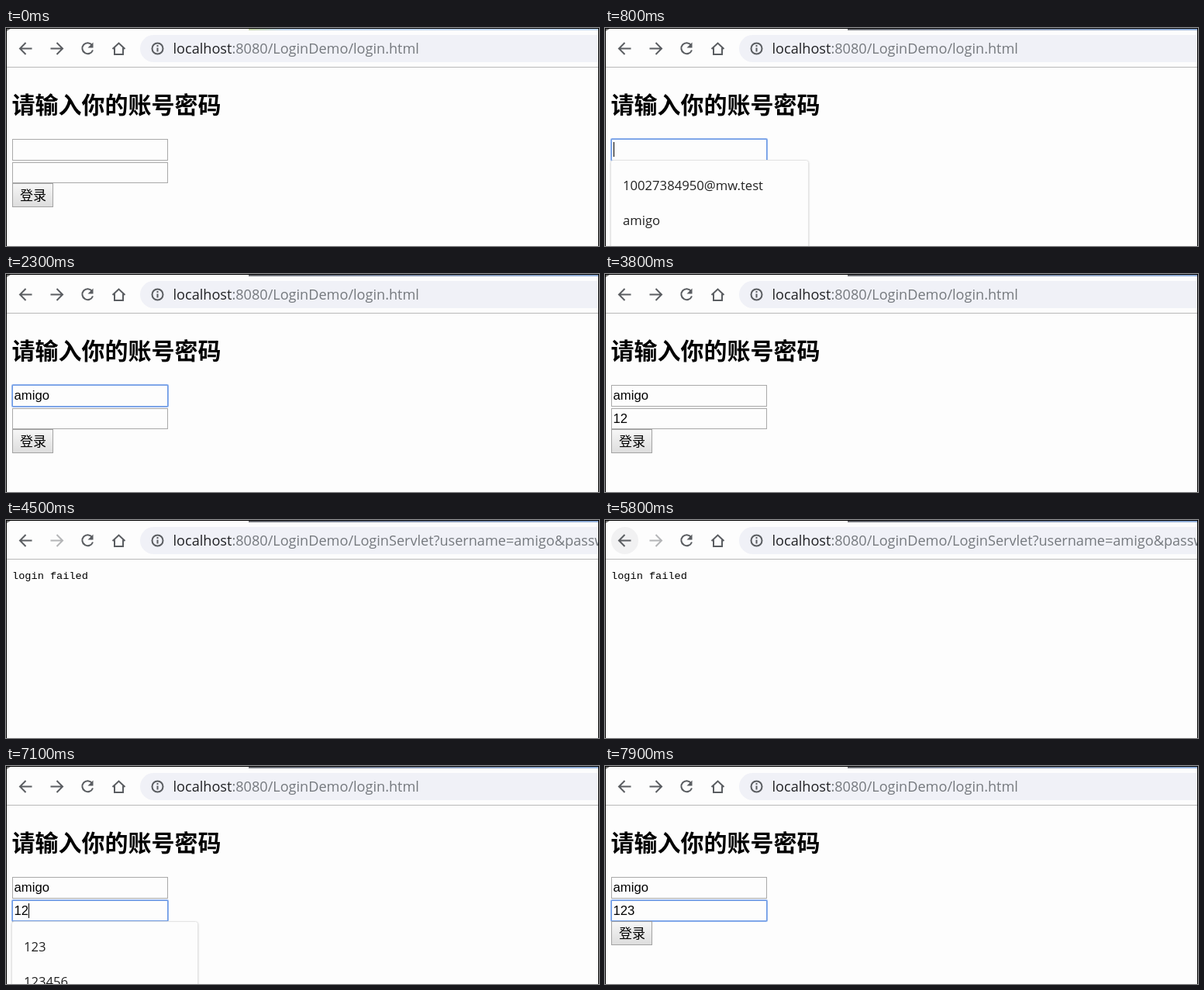
An HTML page that plays this animation: 765x281 px, repeating every 8 s.

```html
<!DOCTYPE html>
<html lang="zh">
<head>
<meta charset="utf-8">
<title>Login demo</title>
<style>
  html, body { margin: 0; width: 100%; height: 100%; overflow: hidden; background: #fdfdfd; }
  svg { display: block; }
  text { white-space: pre; }
  .ui { font-family: "Open Sans", "Noto Sans CJK SC", "Noto Sans CJK", sans-serif; }
  .cjk { font-family: "Noto Sans CJK SC", "Noto Sans CJK", sans-serif; font-weight: 350; }
  .url { font-size: 18.13px; fill: #75797e; }
  .url .host { fill: #202124; }
  .icon { fill: none; stroke: #5a5d61; stroke-width: 2; }
  .field rect { fill: #fdfdfd; stroke: #a9a9a9; }
  .field text { font: 16.67px "Liberation Sans", Arial, sans-serif; }
  .field.focus rect { stroke: #6f9ce6; }
  .field .glow { fill: none; stroke: none; }
  .field.focus .glow { stroke: #8fb1ec; }
  .list rect { fill: #fdfdfd; stroke: #e4e4e4; filter: drop-shadow(0 1px 1px #0003); }
  .list text { font-size: 16.67px; fill: #222; }
  .off { display: none; }
</style>
</head>
<body>
<svg width="765" height="281" viewBox="0 0 765 281">
  <defs>
    <linearGradient id="face" x2="0" y2="1">
      <stop stop-color="#f6f6f6"/><stop offset="1" stop-color="#dddddd"/>
    </linearGradient>
    <linearGradient id="bright">
      <stop stop-color="#c3d3a4"/><stop offset=".1" stop-color="#b9d0ea"/><stop offset="1" stop-color="#c3daf5"/>
    </linearGradient>
    <linearGradient id="dim">
      <stop stop-color="#6b6d72"/><stop offset=".4" stop-color="#7f8ca6"/><stop offset="1" stop-color="#8fadd8"/>
    </linearGradient>
  </defs>

  <rect width="765" height="281" fill="#fdfdfd"/>

  <g id="form">
    <text class="cjk" x="7.5" y="109.5" font-size="30" style="font-weight: 700">请输入你的账号密码</text>
    <g class="field" id="user">
      <rect x="8.5" y="143.5" width="200" height="27"/>
      <rect class="glow" x="7.5" y="142.5" width="202" height="29" rx="1"/>
      <text x="10.6" y="162"></text>
    </g>
    <g class="field" id="pass">
      <rect x="8.5" y="173.5" width="200" height="26"/>
      <rect class="glow" x="7.5" y="172.5" width="202" height="28" rx="1"/>
      <text x="10.6" y="192"></text>
    </g>
    <rect id="button" x="8.5" y="200.5" width="52" height="30" fill="url(#face)" stroke="#a3a3a3"/>
    <text class="cjk" x="18" y="222" font-size="17">登录</text>
    <rect id="caret" width="1" height="19"/>
  </g>

  <text id="result" x="8" y="76" font-size="13.6" font-family="'Liberation Mono', monospace">login failed</text>

  <g class="list ui" id="users">
    <rect x="7.5" y="170.5" width="255" height="130" rx="3"/>
    <text x="23" y="209">10027384950@mw.test</text>
    <text x="23" y="254">amigo</text>
  </g>
  <g class="list ui" id="match">
    <rect x="7.5" y="170.5" width="240" height="67" rx="3"/>
    <text x="23" y="209">amigo</text>
  </g>
  <g class="list ui" id="codes">
    <rect x="7.5" y="200.5" width="240" height="100" rx="3"/>
    <text x="23" y="239">123</text>
    <text x="23" y="284">123456</text>
  </g>

  <rect width="765" height="50" fill="#fdfdfd"/>
  <rect y="50" width="765" height="1" fill="#b9b9b9"/>
  <path d="M764 9H190.5a17.5 17.5 0 0 0 0 35H764Z" fill="#f0f1f7"/>
  <circle id="ring" cx="25.5" cy="26.5" r="17.5"/>
  <g class="icon">
    <g transform="translate(-.5 -.5)">
      <path d="M34 27H19M26 19.5L18.5 27l7.5 7.5"/>
      <path id="forward" d="M58 27H73M66 19.5L73.5 27L66 34.5"/>
      <path d="M111.5 22.5A7 7 0 1 0 112.5 29"/>
      <path d="M113 19v7h-7Z" fill="#5a5d61" stroke="none"/>
      <path d="M138 27.5L146 20l8 7.5M140.5 26v8.5h11V26"/>
    </g>
    <circle cx="195.5" cy="26.5" r="7"/>
    <path d="M195.5 25.5v5M195.5 22v2"/>
  </g>
  <text class="url ui" x="215.5" y="33"><tspan class="host">localhost</tspan><tspan id="path"></tspan></text>

  <g id="tip">
    <rect x="23.5" y="43.5" width="237" height="24" fill="#fff" stroke="#7b7b7b"/>
    <text class="cjk" x="30" y="61" font-size="15" fill="#575757">点击可返回，按住可查看历史记录</text>
  </g>

  <rect id="strip" x="313" y="1" width="451" height="2"/>
  <path d="M0 0H765V281H764V1H1V281H0Z"/>
  <path d="M1 1h5l-5 3Z" fill="#777"/>
</svg>
<script>
  const LOOP = 8000;
  const HOME = ":8080/LoginDemo/login.html";
  const SENT = ":8080/LoginDemo/LoginServlet?username=amigo&password=12";
  const $ = id => document.getElementById(id);

  // Each entry patches the state from its time on.
  const steps = [
    [0, { user: "", pass: "", focus: "", list: "", caret: false, pressed: false, strip: "bright",
          path: HOME, failed: false, forward: true, ring: "none", tip: 0 }],
    [800, { focus: "user", list: "users", caret: true, strip: "dim" }],
    [1200, { user: "a" }],
    [1300, { list: "match" }],
    [1600, { user: "am" }],
    [1700, { user: "ami" }],
    [1800, { user: "amig" }],
    [1900, { user: "amigo", list: "" }],
    [2300, { caret: false }],
    [2700, { focus: "pass", list: "codes", caret: true }],
    [3000, { pass: "1" }],
    [3200, { pass: "12" }],
    [3600, { caret: false }],
    [3800, { focus: "", list: "" }],
    [4200, { pressed: true }],
    [4400, { path: SENT, forward: false, pressed: false }],
    [4500, { failed: true }],
    [5800, { ring: "#f1f1f2" }],
    [6100, { tip: 0.5 }],
    [6200, { tip: 1 }],
    [6400, { path: HOME, failed: false, forward: true, ring: "#dedede", tip: 0 }],
    [6700, { ring: "#e3e3e3" }],
    [6900, { ring: "#f0f0f0" }],
    [7000, { ring: "none" }],
    [7100, { focus: "pass", list: "codes", caret: true }],
    [7500, { pass: "123", list: "" }],
    [7900, { caret: false }]
  ];

  const show = (id, on) => $(id).classList.toggle("off", !on);

  function draw(s) {
    for (const id of ["user", "pass"]) {
      $(id).querySelector("text").textContent = s[id];
      $(id).classList.toggle("focus", s.focus === id);
    }
    for (const id of ["users", "match", "codes"]) show(id, s.list === id);
    show("form", !s.failed);
    show("result", s.failed);
    show("caret", s.caret);
    if (s.caret) {
      const width = s[s.focus] ? $(s.focus).querySelector("text").getComputedTextLength() : 0;
      $("caret").setAttribute("x", Math.max(11, Math.floor(10.6 + width)));
      $("caret").setAttribute("y", s.focus === "user" ? 147 : 177);
    }
    $("button").setAttribute("fill", s.pressed ? "#d6d6d6" : "url(#face)");
    $("button").setAttribute("stroke", s.pressed ? "#777" : "#a3a3a3");
    $("path").textContent = s.path;
    $("forward").style.stroke = s.forward ? "" : "#b4b5b7";
    $("ring").setAttribute("fill", s.ring);
    $("strip").setAttribute("fill", `url(#${s.strip})`);
    $("tip").setAttribute("opacity", s.tip);
  }

  const start = performance.now();
  let last = 0;
  function tick() {
    const time = (performance.now() - start) % LOOP;
    const past = steps.filter(([at]) => at <= time);
    if (past.length !== last) {
      last = past.length;
      draw(Object.assign({}, ...past.map(([, patch]) => patch)));
    }
    requestAnimationFrame(tick);
  }
  tick();
</script>
</body>
</html>
```
